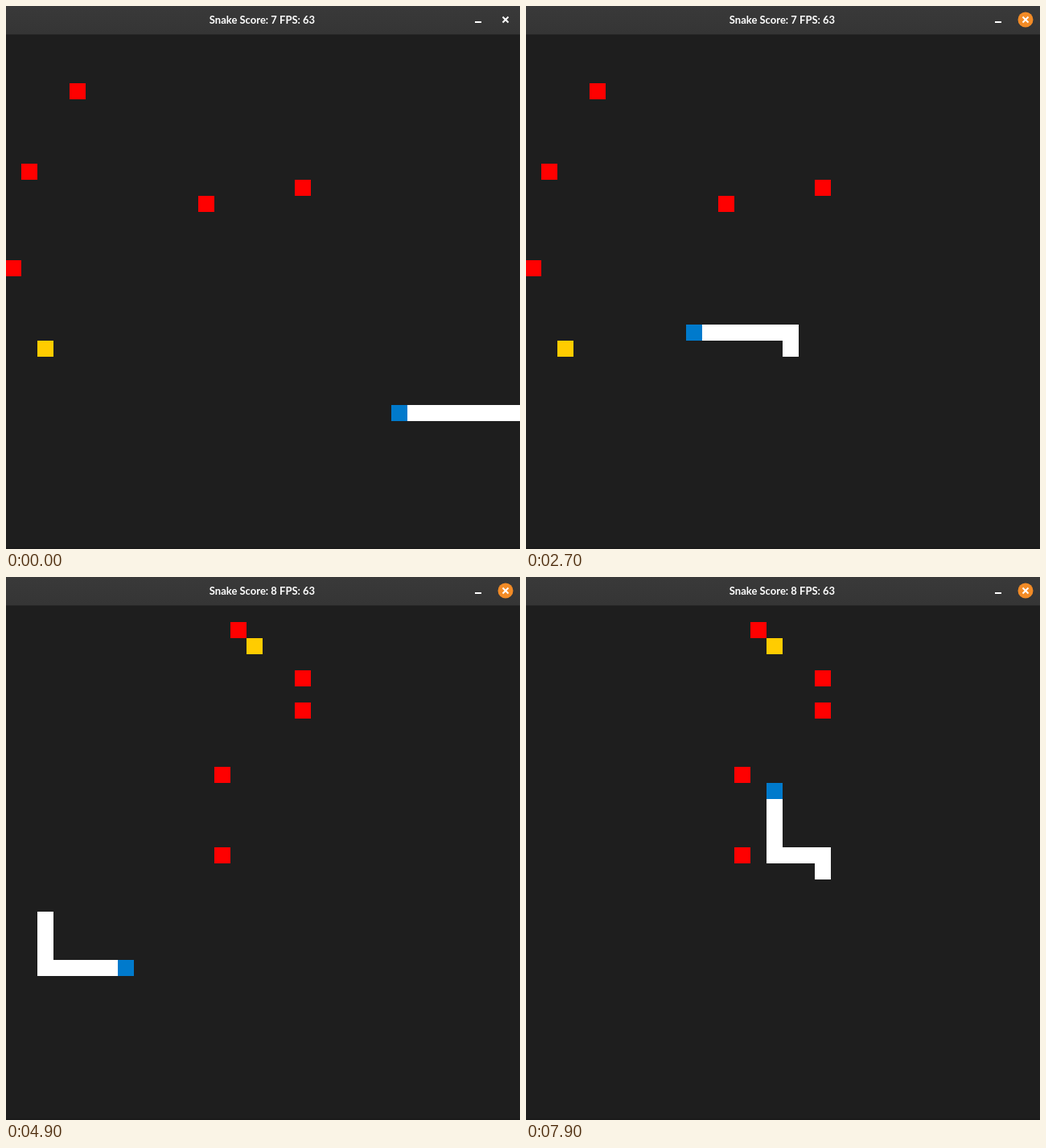
Recreate the animation shown at these times as an HTML page with a canvas. Size 639x675 px, loop 8000 ms.

```html
<!DOCTYPE html>
<html lang="en">
<head>
<meta charset="utf-8">
<title>Snake</title>
<style>
  html, body { margin: 0; width: 100%; height: 100%; overflow: hidden; background: #1e1e1e; }
  canvas, svg { position: absolute; left: 0; top: 0; display: block; }
  text { font: 700 13px Lato, "Open Sans", sans-serif; fill: #fff; text-anchor: middle; }
</style>
</head>
<body>
<canvas id="board" width="639" height="675"></canvas>
<svg width="639" height="36" viewBox="0 0 639 36">
  <defs>
    <linearGradient id="bar" x2="0" y2="1">
      <stop stop-color="#393939"/>
      <stop offset="1" stop-color="#353535"/>
    </linearGradient>
  </defs>
  <rect width="639" height="35" fill="url(#bar)"/>
  <rect y="35" width="639" height="1" fill="#262626"/>
  <text id="caption" x="318.5" y="21.5"></text>
  <rect x="583" y="19" width="8" height="2" fill="#fff"/>
  <circle id="hover" cx="621" cy="17" r="9.5" fill="#f28b26"/>
  <path d="M617.5 13.5l7 7m0-7l-7 7" stroke="#fff" stroke-width="2"/>
</svg>
<script>
const LOOP = 8000, STEP = 100, BEAT = 150, CELL = 20;
const START_LENGTH = 8, MEAL = 28;
const HOVER_FROM = 1000;
// Key presses push the snake one extra cell between beats.
const presses = [2000, 4100, 4400, 6200, 6800, 7000, 7100, 7700];

const rounds = [
  { score: 7, gold: [2, 19], red: [[4, 3], [1, 8], [12, 10], [18, 9], [0, 14]] },
  { score: 8, gold: [15, 2], red: [[14, 1], [18, 4], [18, 6], [13, 10], [13, 15]] }
];

const dirs = { L: [-1, 0], R: [1, 0], U: [0, -1], D: [0, 1] };
const trail = [[31, 23]];
for (const leg of "L15 U5 L14 D4 R12 U4 R4 U3 L3 U4".split(" ")) {
  const [dx, dy] = dirs[leg[0]];
  for (let n = +leg.slice(1); n > 0; n--) {
    const [x, y] = trail[trail.length - 1];
    trail.push([x + dx, y + dy]);
  }
}

const ctx = document.getElementById("board").getContext("2d");
const caption = document.getElementById("caption");
const hover = document.getElementById("hover");

function cell([x, y], color) {
  ctx.fillStyle = color;
  ctx.fillRect(x * CELL - 1, y * CELL + 36, CELL, CELL);
}

function draw(t) {
  const moves = Math.floor((t + 50) / BEAT) + presses.filter(p => p <= t).length;
  const fed = moves >= MEAL ? 1 : 0;
  const { score, gold, red } = rounds[fed];
  const head = moves + START_LENGTH - 1;
  const tail = head - START_LENGTH + 1 - fed;

  ctx.fillStyle = "#1e1e1e";
  ctx.fillRect(0, 0, 639, 675);
  ctx.fillStyle = "#1a1a1a";
  ctx.fillRect(0, 673, 639, 2);
  red.forEach(p => cell(p, "#f00"));
  cell(gold, "#fc0");
  trail.slice(tail, head).forEach(p => cell(p, "#fff"));
  cell(trail[head], "#007acc");

  const fps = t >= 300 && t < 600 ? 62 : 63;
  caption.textContent = `Snake Score: ${score} FPS: ${fps}`;
  hover.style.visibility = t >= HOVER_FROM ? "visible" : "hidden";
}

const origin = performance.now();
let shown = -1;
function tick() {
  const t = Math.floor((performance.now() - origin) % LOOP / STEP) * STEP;
  if (t !== shown) draw(shown = t);
  requestAnimationFrame(tick);
}
tick();
</script>
</body>
</html>
```
